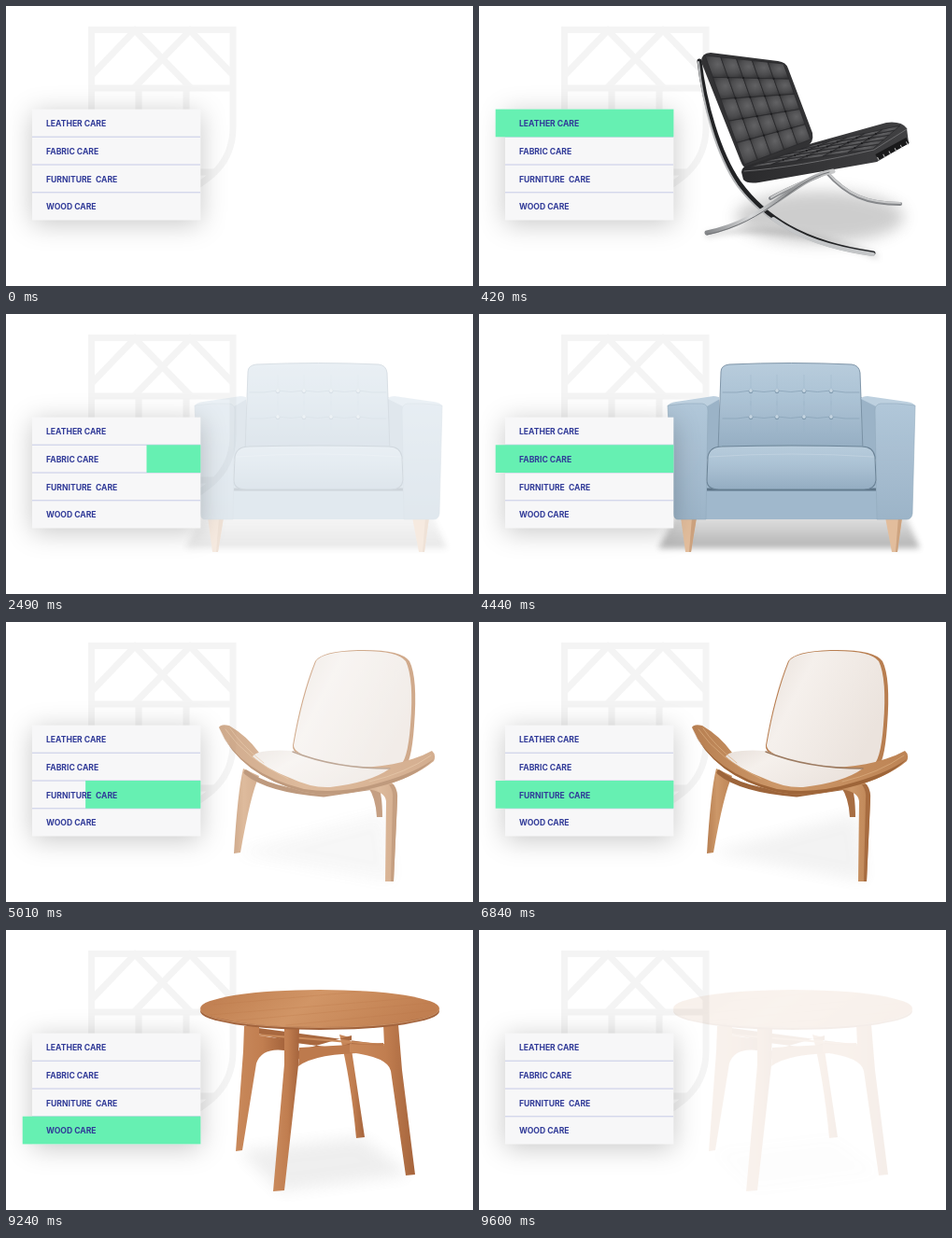
An HTML page that plays this animation: 500x300 px, repeating every 9630 ms.

```html
<!DOCTYPE html>
<html lang="en">
<head>
<meta charset="utf-8">
<title>Furniture care</title>
<style>
  html, body { margin: 0; height: 100%; overflow: hidden; background: #fff; }
  svg { display: block; width: 100vw; height: 100vh; }
  .shield { fill: none; stroke: #f4f4f4; stroke-width: 7; }
  .panel { filter: drop-shadow(0 4px 14px rgba(0, 0, 0, .22)); }
  .label { font: 700 8.6px Inter, sans-serif; fill: #303a98; white-space: pre; }
  .line { fill: none; stroke-linecap: round; stroke-linejoin: round; }
</style>
</head>
<body>
<svg viewBox="0 0 500 300">
  <defs>
    <filter id="soft" x="-30%" y="-100%" width="160%" height="300%"><feGaussianBlur stdDeviation="8"/></filter>
    <filter id="blur" x="-30%" y="-100%" width="160%" height="300%"><feGaussianBlur stdDeviation="3"/></filter>
    <radialGradient id="tuft" cx=".55" cy=".4" r=".65">
      <stop stop-color="#626264"/><stop offset=".6" stop-color="#4c4c4e"/><stop offset="1" stop-color="#353537"/>
    </radialGradient>
    <linearGradient id="side" x2="1">
      <stop stop-color="#2a2a2c"/><stop offset="1" stop-color="#414143"/>
    </linearGradient>
    <linearGradient id="chrome" x2="1">
      <stop stop-color="#85878a"/><stop offset=".35" stop-color="#d8d9da"/><stop offset=".65" stop-color="#8e9092"/><stop offset="1" stop-color="#c9cacb"/>
    </linearGradient>
    <linearGradient id="fabric" x2="0" y2="1">
      <stop stop-color="#b1c7d9"/><stop offset="1" stop-color="#9bb4c8"/>
    </linearGradient>
    <linearGradient id="cushion" x2="0" y2="1">
      <stop stop-color="#b8ccdc"/><stop offset=".4" stop-color="#acc3d5"/><stop offset="1" stop-color="#93adc2"/>
    </linearGradient>
    <linearGradient id="floor" x2="0" y2="1">
      <stop stop-color="#777" stop-opacity=".2"/><stop offset="1" stop-color="#666" stop-opacity=".5"/>
    </linearGradient>
    <linearGradient id="cream" x2="1" y2=".5">
      <stop stop-color="#e7dfd9"/><stop offset=".35" stop-color="#f5f0ec"/><stop offset="1" stop-color="#ebe3dd"/>
    </linearGradient>
    <linearGradient id="oak" x2="1">
      <stop stop-color="#b77e50"/><stop offset=".4" stop-color="#cd9768"/><stop offset="1" stop-color="#bd8354"/>
    </linearGradient>
    <linearGradient id="top" x2="1" y2=".2">
      <stop stop-color="#bd7a4b"/><stop offset=".5" stop-color="#d19465"/><stop offset="1" stop-color="#c17e4f"/>
    </linearGradient>
    <linearGradient id="leg" x2="1">
      <stop stop-color="#c9885a"/><stop offset=".55" stop-color="#c17d4e"/><stop offset="1" stop-color="#a5633a"/>
    </linearGradient>
  </defs>

  <g class="shield">
    <path d="M91.5 25.5H243V130C243 166 223 188 167 212C112 188 91.5 166 91.5 130ZM91.5 88H243M142 88V200M193 88V200M100 178H224"/>
    <path d="M92 74L138 26L198 88M137 88L197 26L243 74"/>
  </g>

  <!-- Leather lounge chair -->
  <g class="item">
    <ellipse cx="365" cy="226" rx="90" ry="28" fill="#777" opacity=".36" filter="url(#soft)"/>
    <path d="M245 245Q330 230 425 268" class="line" stroke="#777" opacity=".3" stroke-width="5" filter="url(#blur)"/>
    <g class="line">
      <path d="M312 206C340 190 358 186 372 178C394 203 415 212 451 212" stroke="#85878a" stroke-width="4"/>
      <path d="M313 205C340 189 358 185 372 177C394 202 415 211 451 211" stroke="#c8c9ca" stroke-width="2"/>
    </g>
    <path d="M238 60Q238 50 248 50L320 59Q329 60 331 67L357 136Q359 147 350 151L292 174Q284 177 280 166Z" fill="#323234"/>
    <g id="backTufts"></g>
    <path d="M281 178Q281 172 290 170L357 147L436 125Q452 123 458 131L460 147L426 167L300 189Q287 191 283 186Z" fill="url(#side)"/>
    <g id="seatTufts"></g>
    <path d="M284 177Q340 173 423 154L458 132" class="line" stroke="#6c6c6e"/>
    <path d="M426 162L459 144" class="line" stroke="#19191a" stroke-width="7" style="stroke-linecap:butt"/>
    <path d="M427 164L459 147" class="line" stroke="#bbb" stroke-width="4" stroke-dasharray="1 6" style="stroke-linecap:butt"/>
    <g class="line">
      <path d="M236 59C241 103 256 157 278 189C305 226 345 254 422 265" stroke="#222325" stroke-width="5"/>
      <path d="M235 60C239 104 254 160 277 193C305 230 348 257 421 267" stroke="#b5b7b9" stroke-width="2"/>
      <path d="M379 177C335 185 310 230 244 243" stroke="url(#chrome)" stroke-width="5"/>
      <path d="M375 178C334 188 311 231 244 245" stroke="#707275" stroke-width="1"/>
      <path d="M315 228C345 249 375 259 422 266" stroke="#c4c6c8" stroke-width="4"/>
    </g>
  </g>

  <!-- Fabric armchair -->
  <g class="item">
    <path d="M212 214H456L472 251H192Z" fill="url(#floor)" filter="url(#blur)"/>
    <path d="M216 218H233L227 255H221ZM435 218H453L448 255H442Z" fill="#e2bd9b"/>
    <path d="M228 218H233L227 255H225ZM449 218H453L448 255H446Z" fill="#cda27e"/>
    <path d="M244 98L257 89L258 144L244 156ZM425 98L409 89V144L425 156Z" fill="#9ab3c7"/>
    <path d="M259 62Q259 55 268 54Q335 51 399 54Q407 55 408 63L411 146H256Z" fill="url(#cushion)" stroke="#758da1" stroke-width=".9"/>
    <g id="buttons"></g>
    <path d="M202 99Q203 95 211 94L251 88Q257 88 258 91L244 99ZM467 99Q466 95 458 94L416 88Q410 88 409 91L425 99Z" fill="#bdd0df"/>
    <path d="M243 180H427V220H243Z" fill="#9fb8cc"/>
    <path d="M244 188H425" stroke="#5d7487" stroke-width="3"/>
    <path d="M202 98Q222 95 239 96Q245 97 245 103L243 220H213Q209 220 208 214ZM467 98Q447 95 430 96Q424 97 424 103L426 220H458Q463 220 464 214Z" fill="url(#fabric)" stroke="#90a9bd" stroke-width=".6"/>
    <path d="M245 153Q247 142 260 142Q335 140 410 142Q422 142 424 153L425 178Q424 188 412 188H257Q244 188 244 178Z" fill="url(#cushion)" stroke="#6a8296" stroke-width="1.1"/>
    <path d="M247 153Q335 147 422 153" class="line" stroke="#c3d4e1" stroke-width=".8"/>
  </g>

  <!-- Shell chair -->
  <g class="item">
    <path d="M247 247L405 205L414 278Z" fill="#999" opacity=".12" filter="url(#soft)"/>
    <path d="M387 176L398 174Q403 184 403 209H397Q396 188 387 176Z" fill="#a66c40"/>
    <path d="M254 157L271 165Q262 184 251 247L244 248Q248 181 254 157Z" fill="url(#oak)"/>
    <path d="M257 161Q280 180 340 185L400 176" class="line" stroke="#9c6439" stroke-width="5"/>
    <path d="M385 176L409 169Q419 175 419 190L415 278H406L407 192Q406 181 385 179Z" fill="url(#oak)"/>
    <path d="M415 174Q420 181 419 191L415 278H412L414 190Q415 181 410 174Z" fill="#a66b3e"/>
    <path d="M331 42Q338 31 377 30Q423 29 432 42Q441 60 437 111Q434 154 425 157Q393 163 342 153Q305 144 307 132Q316 79 331 42Z" fill="#b87d4e"/>
    <path d="M332 42Q339 32 376 31Q419 30 428 42Q437 61 433 110Q430 151 420 155Q391 159 344 150Q307 142 308 132Q317 80 332 42Z" fill="url(#cream)"/>
    <path d="M228 113Q230 109 239 111Q258 122 271 140C303 154 398 169 456 138Q461 142 458 149Q435 168 397 177Q352 189 319 182Q251 165 228 113Z" fill="url(#oak)"/>
    <path d="M228 114Q251 162 319 179Q360 185 401 172Q440 161 459 146Q439 167 397 177Q352 189 319 182Q251 165 228 114Z" fill="#9d6437"/>
    <path d="M264 144Q270 136 306 138Q360 157 411 157Q390 172 347 177Q327 178 304 167Q278 157 264 144Z" fill="url(#cream)"/>
    <path d="M307 139Q352 157 411 157" class="line" stroke="#9b795f" stroke-width="1.4"/>
    <g class="line" stroke="#dcae80" stroke-width=".7">
      <path d="M235 115Q257 147 302 168M240 114Q251 131 276 151M389 171Q428 162 455 143"/>
    </g>
  </g>

  <!-- Wooden table -->
  <g class="item">
    <path d="M250 237L380 222L433 262L293 280Z" fill="#999" opacity=".16" filter="url(#soft)"/>
    <path d="M357 112L368 115Q374 155 384 222L375 223Q369 159 357 112Z" fill="url(#leg)"/>
    <path d="M266 110L310 121L405 133V123L270 105ZM311 130L370 113V121L311 139Z" fill="#a7673d"/>
    <path d="M267 112L405 123" class="line" stroke="#ca8a5b" stroke-width="2"/>
    <path d="M255 103H271V113L298 117V129Q274 126 268 143L253 236L246 237L254 130Z" fill="url(#leg)"/>
    <path d="M314 126L404 121V132Q334 130 313 146Z" fill="#bd794b"/>
    <path d="M298 104H314L313 145L298 279L286 280L298 144Z" fill="url(#leg)"/>
    <path d="M404 101H420L424 150L438 262L428 263L412 151Q409 136 368 131V122L405 124Z" fill="url(#leg)"/>
    <ellipse cx="336" cy="87" rx="128" ry="20" fill="#a1623a"/>
    <ellipse cx="336" cy="84" rx="128" ry="20" fill="url(#top)"/>
    <g class="line" stroke="#b87548" stroke-width=".5" opacity=".55">
      <path d="M222 80L380 66M218 91L435 73M247 97L455 78M300 102L460 86"/>
    </g>
    <path d="M208 85C213 111 459 111 464 85" class="line" stroke="#dca477" stroke-width=".7"/>
  </g>

  <rect class="panel" x="28" y="110.7" width="180.3" height="118.8" fill="#f7f7f8"/>
  <path d="M28 140.2H208M28 170H208M28 199.8H208" stroke="#c6cae6"/>
  <g id="menu"></g>
</svg>
<script>
const LOOP = 9630, SLIDE = 2400, STEP = 30;
const RIGHT = 208.4, BAR_WIDTH = 190.7;
const rows = ['LEATHER CARE', 'FABRIC CARE', 'FURNITURE  CARE', 'WOOD CARE'];
const byId = id => document.getElementById(id);

byId('menu').innerHTML = rows.map((name, i) => {
  const y = 110.6 + i * 29.7;
  return `<rect class="bar" y="${y}" height="29.7" fill="#66f0b2"/>
    <text class="label" x="43" y="${y + 18.6}">${name}</text>`;
}).join('');

// Fills a four-cornered area with padded leather cells.
function tufts(id, [a, b, c, d], columns, lines) {
  const mix = (p, q, k) => p.map((v, i) => v + (q[i] - v) * k);
  const at = (u, v) => mix(mix(a, b, u / columns), mix(d, c, u / columns), v / lines);
  let markup = '';
  for (let v = 0; v < lines; v++) {
    for (let u = 0; u < columns; u++) {
      const cell = [at(u, v), at(u + 1, v), at(u + 1, v + 1), at(u, v + 1)];
      markup += `<path d="M${cell.join('L')}Z" fill="url(#tuft)" stroke="#2a2a2c" stroke-width=".8" stroke-linejoin="round"/>`;
      if (u && v) markup += `<circle cx="${cell[0][0]}" cy="${cell[0][1]}" r="1.1" fill="#1c1c1e"/>`;
    }
  }
  byId(id).innerHTML = markup;
}
tufts('backTufts', [[242, 53], [326, 62], [355, 143], [284, 170]], 5, 5);
tufts('seatTufts', [[286, 174], [357, 149], [451, 128], [422, 153]], 5, 5);

byId('buttons').innerHTML = [82, 110].map(y =>
  `<path d="M261 ${y + 2}Q276 ${y + 3} 291 ${y}Q305 ${y + 3} 319 ${y}Q334 ${y + 3} 348 ${y}Q362 ${y + 3} 377 ${y}Q392 ${y + 3} 407 ${y + 2}" class="line" stroke="#8da7bc" stroke-width=".9"/>` +
  [291, 319, 348, 377].map(x =>
    `<path d="M${x} ${y - 17}V${y + 16}" stroke="#96afc3" stroke-width=".6" opacity=".6"/>
     <circle cx="${x}" cy="${y + .7}" r="2.4" fill="#7893a9"/><circle cx="${x}" cy="${y}" r="1.9" fill="#c5d5e1"/>`).join('')
).join('');

const items = document.querySelectorAll('.item');
const bars = document.querySelectorAll('.bar');
const progress = (t, from, to) => Math.min(1, Math.max(0, (t - from) / (to - from)));

function draw(now) {
  const time = Math.floor(now % LOOP / STEP) * STEP;
  rows.forEach((_, i) => {
    const t = time - i * SLIDE;
    const shown = 1 - (1 - progress(t, 0, 420)) ** 1.5;
    const opacity = shown * (1 - progress(t, 2020, 2430) ** 1.5);
    const width = BAR_WIDTH * shown * (1 - progress(t, 2030, 2400) ** 2.5);
    items[i].setAttribute('opacity', opacity);
    bars[i].setAttribute('x', RIGHT - width);
    bars[i].setAttribute('width', width);
  });
}

const start = performance.now();
function tick() {
  draw(performance.now() - start);
  requestAnimationFrame(tick);
}
draw(0);
requestAnimationFrame(tick);
</script>
</body>
</html>
```
